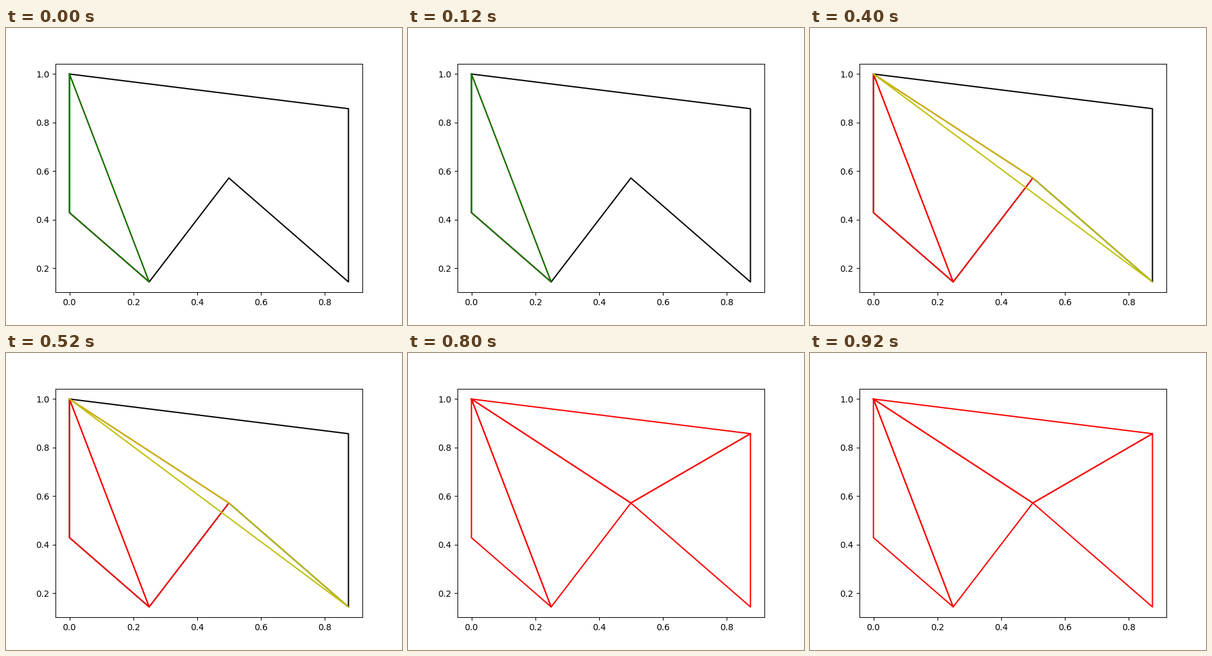
Recreate the animation shown at these times as a matplotlib script. Size 640 by 480 pixels, loop 1000 ms.

```python
import matplotlib.pyplot as plt
from matplotlib.animation import ArtistAnimation

# Ear clipping of a simple polygon
POINTS = {
    "A": (0, 1),
    "B": (0, 3 / 7),
    "C": (1 / 4, 1 / 7),
    "D": (1 / 2, 4 / 7),
    "E": (7 / 8, 1 / 7),
    "F": (7 / 8, 6 / 7),
}
OUTLINE = ("ABCDEFA", "k")

fig, ax = plt.subplots(figsize=(6.4, 4.8), dpi=100)


def draw(path, color):
    xs, ys = zip(*(POINTS[name] for name in path))
    return ax.plot(xs, ys, color=color, linewidth=1.5)[0]


def clipped(*triangles):
    return [(path, "r") for path in triangles]


def accepted(path):
    return [(path, "r"), (path, "g")]


steps = [
    [OUTLINE, ("BCA", "r"), ("ABCA", "g"), ("AB", "g")],
    [OUTLINE, *clipped("ABCA", "ABC"), *accepted("ACDA")],
    [OUTLINE, *clipped("ABCA", "ACDA"), ("ADEA", "y")],
    [OUTLINE, *clipped("ABCA", "ACDA"), *accepted("DEFD")],
    clipped("ABCA", "ACDA", "DEFD", "ADFA"),
]

frames = [[draw(*line) for line in step] for step in steps]
animation = ArtistAnimation(fig, frames, interval=200, repeat=True, repeat_delay=0)

plt.show()
```
